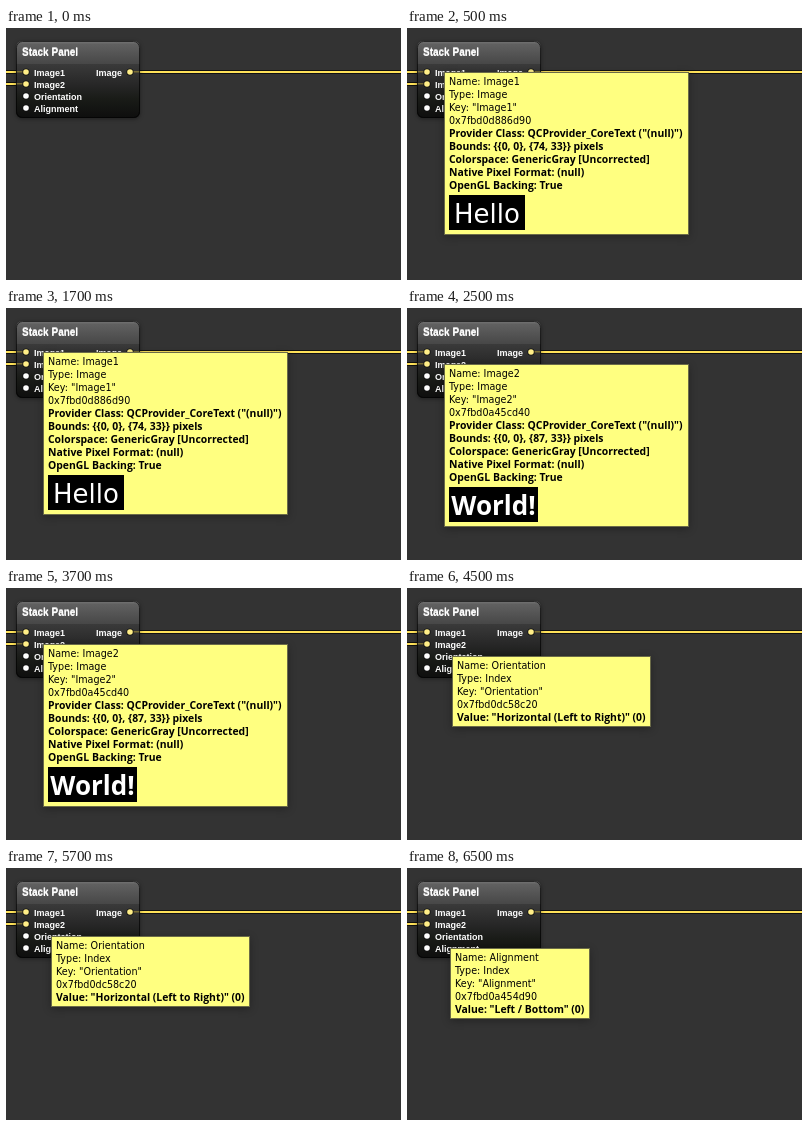
These frames come from a looping animation (395x252 px, 8 s). An HTML page with a canvas:

```html
<!DOCTYPE html>
<html lang="en">
<head>
<meta charset="utf-8">
<title>Stack Panel inspector</title>
<style>
html, body { margin: 0; width: 100%; height: 100%; overflow: hidden; background: #333; }
canvas { display: block; }
</style>
</head>
<body>
<canvas></canvas>
<script>
const W = 395, H = 252, LOOP = 8000;
const canvas = document.querySelector('canvas');
const ctx = canvas.getContext('2d');
const ratio = window.devicePixelRatio || 1;
canvas.width = W * ratio;
canvas.height = H * ratio;
canvas.style.width = W + 'px';
canvas.style.height = H + 'px';
ctx.scale(ratio, ratio);

const LABEL = '"Liberation Sans", Arial, sans-serif';
const PLAIN = '"DejaVu Sans", sans-serif';
const STRONG = '"Open Sans", "Noto Sans", sans-serif';

const imageInfo = (width) => [
  'Provider Class: QCProvider_CoreText ("(null)")',
  `Bounds: {{0, 0}, {${width}, 33}} pixels`,
  'Colorspace: GenericGray [Uncorrected]',
  'Native Pixel Format: (null)',
  'OpenGL Backing: True'
];

const tips = [
  { start: 500, x: 37, y: 44, w: 245, h: 163, name: 'Image1', type: 'Image',
    address: '0x7fbd0d886d90', info: imageInfo(74),
    preview: { text: 'Hello', w: 76, font: `26px ${PLAIN}` } },
  { start: 2500, x: 37, y: 56, w: 245, h: 163, name: 'Image2', type: 'Image',
    address: '0x7fbd0a45cd40', info: imageInfo(87),
    preview: { text: 'World!', w: 89, font: `bold 26px ${STRONG}` } },
  { start: 4500, x: 45, y: 68, w: 199, h: 71, name: 'Orientation', type: 'Index',
    address: '0x7fbd0dc58c20', info: ['Value: "Horizontal (Left to Right)" (0)'] },
  { start: 6500, x: 43, y: 80, w: 140, h: 71, name: 'Alignment', type: 'Index',
    address: '0x7fbd0a454d90', info: ['Value: "Left / Bottom" (0)'] }
];

function rect(x, y, w, h, fill) {
  ctx.fillStyle = fill;
  ctx.fillRect(x, y, w, h);
}

function text(str, x, y, font, fill, align = 'left') {
  ctx.font = font;
  ctx.fillStyle = fill;
  ctx.textAlign = align;
  ctx.fillText(str, x, y);
}

function dot(x, y, r, fill) {
  ctx.beginPath();
  ctx.arc(x, y, r, 0, 7);
  ctx.fillStyle = fill;
  ctx.fill();
}

function gradient(y0, y1, ...stops) {
  const g = ctx.createLinearGradient(0, y0, 0, y1);
  stops.forEach(([at, color]) => g.addColorStop(at, color));
  return g;
}

function shadow(alpha, blur, offset) {
  ctx.shadowColor = `rgba(0,0,0,${alpha})`;
  ctx.shadowBlur = blur * ratio;
  ctx.shadowOffsetY = offset * ratio;
}

function cable(x0, x1, y) {
  rect(x0, y - 2, x1 - x0, 4, '#111');
  rect(x0, y - 1, x1 - x0, 2, '#ffe259');
}

function port(x, y, fill) {
  dot(x, y, 3.6, '#111');
  dot(x, y, 2.8, fill);
}

function drawNode() {
  ctx.save();
  shadow(.4, 4, 1);
  ctx.beginPath();
  ctx.roundRect(10, 13, 124, 77, 6);
  ctx.fillStyle = '#111';
  ctx.fill();
  ctx.restore();

  ctx.save();
  ctx.clip();
  rect(10, 13, 124, 23, gradient(13, 36, [0, '#777'], [.15, '#606060'], [1, '#474747']));
  rect(10, 36, 124, 54, gradient(36, 90, [0, '#3a3a3a'], [.4, '#262626'], [.65, '#191b17'], [1, '#0e0e0e']));
  rect(10, 43, 10, 1.5, '#766b34');
  rect(10, 55, 10, 1.5, '#766b34');
  rect(124, 43, 10, 1.5, '#766b34');
  ctx.restore();
  ctx.beginPath();
  ctx.roundRect(10.5, 13.5, 123, 76, 6);
  ctx.strokeStyle = 'rgba(0,0,0,.65)';
  ctx.lineWidth = 1;
  ctx.stroke();

  // The title is printed twice, one pixel apart, which makes it heavy.
  text('Stack Panel', 16, 27, `bold 10px ${LABEL}`, '#ccc');
  text('Stack Panel', 16, 28, `bold 10px ${LABEL}`, '#fff');

  const font = `bold 9px ${LABEL}`;
  ['Image1', 'Image2', 'Orientation', 'Alignment'].forEach((label, i) => {
    const y = 44 + 12 * i;
    port(20, y, i < 2 ? '#ffee87' : '#fff');
    text(label, 28, y + 4, font, '#fff');
  });
  text('Image', 116, 48, font, '#fff', 'right');
  port(124, 44, '#ffee87');
}

function drawTip({ x, y, w, h, name, type, address, info, preview }) {
  ctx.save();
  shadow(.3, 8, 2);
  rect(x, y, w, h, '#6b6b48');
  ctx.restore();
  rect(x + 1, y + 1, w - 2, h - 2, '#ffff80');

  const plain = [`Name: ${name}`, `Type: ${type}`, `Key: "${name}"`, address];
  [...plain, ...info].forEach((line, i) => {
    const font = i < plain.length ? `9.6px ${PLAIN}` : `bold 10.4px ${STRONG}`;
    text(line, x + 5, y + 13 + 13 * i, font, '#000');
  });

  if (preview) {
    rect(x + 5, y + 123, preview.w, 35, '#000');
    text(preview.text, x + 5 + preview.w / 2, y + 151, preview.font, '#fff', 'center');
  }
}

function draw(now) {
  const t = now % LOOP;
  rect(0, 0, W, H, '#333');
  cable(0, 11, 44);
  cable(0, 11, 56);
  cable(133, W, 44);
  drawNode();
  const tip = tips.filter((item) => item.start <= t).pop();
  if (tip) drawTip(tip);
}

const begin = performance.now();
function tick() {
  draw(performance.now() - begin);
  requestAnimationFrame(tick);
}
tick();
</script>
</body>
</html>
```
